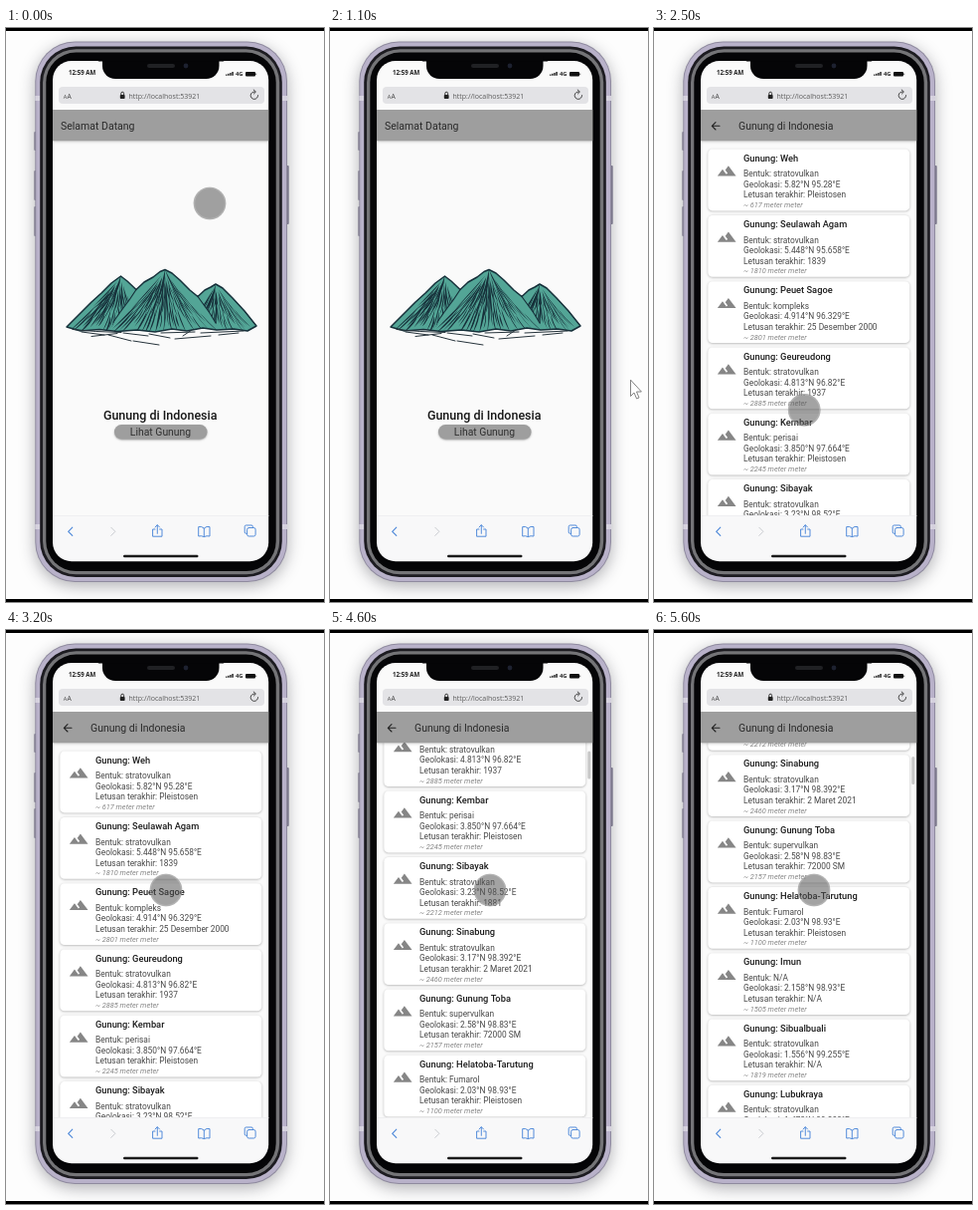
An HTML page with a canvas for the animation above (5.7 s loop, 320 by 576 pixels).

```html
<!DOCTYPE html>
<html lang="id">
<head>
<meta charset="utf-8">
<title>Gunung di Indonesia</title>
<style>
html, body { margin: 0; width: 100%; height: 100%; overflow: hidden; background: #fdfdfd; }
canvas { display: block; width: 320px; height: 576px; }
</style>
</head>
<body>
<canvas id="stage"></canvas>
<script>
const W = 320, H = 576, LOOP = 5700;
const cv = document.getElementById('stage');
const dpr = window.devicePixelRatio || 1;
cv.width = W * dpr;
cv.height = H * dpr;
const c = cv.getContext('2d');
const SANS = 'Roboto, sans-serif';
const BLUE = '#4a86d8';

// name, shape, position, last eruption, height
const peaks = [
  ['Weh', 'stratovulkan', '5.82°N 95.28°E', 'Pleistosen', 617],
  ['Seulawah Agam', 'stratovulkan', '5.448°N 95.658°E', '1839', 1810],
  ['Peuet Sagoe', 'kompleks', '4.914°N 96.329°E', '25 Desember 2000', 2801],
  ['Geureudong', 'stratovulkan', '4.813°N 96.82°E', '1937', 2885],
  ['Kembar', 'perisai', '3.850°N 97.664°E', 'Pleistosen', 2245],
  ['Sibayak', 'stratovulkan', '3.23°N 98.52°E', '1881', 2212],
  ['Sinabung', 'stratovulkan', '3.17°N 98.392°E', '2 Maret 2021', 2460],
  ['Gunung Toba', 'supervulkan', '2.58°N 98.83°E', '72000 SM', 2157],
  ['Helatoba-Tarutung', 'Fumarol', '2.03°N 98.93°E', 'Pleistosen', 1100],
  ['Imun', 'N/A', '2.158°N 98.93°E', 'N/A', 1505],
  ['Sibualbuali', 'stratovulkan', '1.556°N 99.255°E', 'N/A', 1819],
  ['Lubukraya', 'stratovulkan', '1.478°N 99.209°E', 'N/A', 1862]
];

// time, x, y
const path = [
  [0, 205, 176], [250, 212, 190], [600, 246, 262], [850, 284, 326], [1100, 302, 353],
  [1300, 309, 361], [1450, 294, 372], [1650, 190, 402], [1800, 149, 413],
  [2350, 149, 411], [2900, 161, 261], [LOOP, 161, 261]
];
const notches = [3450, 3800, 4200, 4500, 4850, 5150, 5450];
const NOTCH = 56.3, PITCH = 66.3, OPEN = 2050;

const clamp = v => Math.max(0, Math.min(1, v));
const ease = v => v * v * (3 - 2 * v);

function pointerAt(t) {
  let i = 1;
  while (i < path.length - 1 && path[i][0] < t) i++;
  const a = path[i - 1], b = path[i], k = ease(clamp((t - a[0]) / (b[0] - a[0])));
  return [a[1] + (b[1] - a[1]) * k, a[2] + (b[2] - a[2]) * k];
}

function box(x, y, w, h, r, fill) {
  c.beginPath();
  c.roundRect(x, y, w, h, r);
  c.fillStyle = fill;
  c.fill();
}

function shadow(color, blur, dy) {
  c.shadowColor = color;
  c.shadowBlur = blur * dpr;
  c.shadowOffsetY = dy * dpr;
}
const noShadow = () => shadow('transparent', 0, 0);

function text(s, x, y, font, color, align = 'left') {
  c.font = font;
  c.fillStyle = color;
  c.textAlign = align;
  c.fillText(s, x, y);
}

function line(d, color, width) {
  c.strokeStyle = color;
  c.lineWidth = width;
  c.stroke(new Path2D(d));
}

function shape(d, x, y, scale, color) {
  c.save();
  c.translate(x, y);
  c.scale(scale, scale);
  c.fillStyle = color;
  c.fill(new Path2D(d));
  c.restore();
}

function phone() {
  const edge = '#8f8a9f';
  box(28.3, 104, 3, 19, 1, edge);
  box(28.3, 143, 3, 30, 1, edge);
  box(28.3, 179, 3, 30, 1, edge);
  box(281.7, 138, 3, 59, 1, edge);
  shadow('rgba(40,40,50,.36)', 16, 4);
  box(29.3, 13.5, 253.7, 542.5, 40, edge);
  noShadow();
  box(30.3, 14.5, 251.7, 540.5, 39, '#b8b1c9');
  for (const y of [68, 498]) {
    box(29.3, y, 5, 5, 0, '#d5d1de');
    box(278, y, 5, 5, 0, '#d5d1de');
  }
  box(34.2, 18.5, 243.6, 532.5, 36, '#1c1b20');
  box(37, 21.3, 238.2, 527, 33.5, '#747477');
  box(40.3, 24.6, 231.4, 520.4, 30, '#050507');
}

function browser() {
  box(47, 33, 218, 49, 0, '#fafafa');
  text('12:59 AM', 63, 47.2, 'bold 6.1px "Open Sans", sans-serif', '#202020');
  for (let i = 0; i < 4; i++) box(221 + i * 2.1, 47.7 - 1.2 - i * .8, 1.5, 1.2 + i * .8, .3, '#222');
  text('4G', 231, 48.1, 'bold 5.8px "Open Sans", sans-serif', '#222');
  box(241, 44, 10, 4.4, 1, '#111');
  box(251.3, 45.4, .9, 1.6, .4, '#333');

  box(53, 59, 207, 17, 4, '#e3e3e6');
  text('A', 57.8, 71.4, '5.6px "Open Sans", sans-serif', '#444');
  text('A', 61.4, 71.4, '6.8px "Open Sans", sans-serif', '#444');
  box(114.8, 67, 4.8, 4, .8, '#222');
  line('M115.8 67V65.6a1.4 1.4 0 0 1 2.8 0V67', '#222', .9);
  text('http://localhost:53921', 123.5, 70.6, '7px "Open Sans", sans-serif', '#5c5c5c');
  line('M253.6 67.6A3.7 3.7 0 1 1 250.4 64', '#333', .9);
  line('M249.2 62L251.4 64L249.4 66', '#333', .9);

  box(47, 489, 218, 48, 0, '#f8f8f9');
  box(47, 489, 218, .6, 0, '#e8e8ea');
  line('M66.8 501.2L62.7 505.3L66.8 509.4', BLUE, 1.1);
  line('M105.8 501.2L109.9 505.3L105.8 509.4', '#c9cbd0', 1);
  line('M150 503H147.6V510.2H157V503H154.6M152.3 507.3V498.8M150 501L152.3 498.7L154.6 501', BLUE, .95);
  line('M199.3 502Q196.7 499.6 193.7 500.6V510Q196.7 509.2 199.3 510.6Q201.9 509.2 205 510V500.6Q201.9 499.6 199.3 502V510.5', BLUE, .95);
  c.beginPath();
  c.roundRect(242.6, 501.5, 8.5, 8.5, 1.8);
  c.stroke();
  line('M242.6 507.3H241.6Q240.2 507.3 240.2 506V500.4Q240.2 499 241.6 499H247Q248.4 499 248.4 500.4V501.5', BLUE, .95);
  box(118, 528.7, 75.5, 2.5, 1.25, '#1a1a1a');
}

function notch() {
  box(97, 28, 117.5, 23, [0, 0, 13, 13], '#050507');
  box(93, 32, 126, 1.5, 0, '#050507');
  box(142, 36, 28, 4, 2, '#202124');
  c.beginPath();
  c.arc(181, 38, 2.4, 0, 7);
  c.fillStyle = '#1d2130';
  c.fill();
}

function appBar(title, x) {
  shadow('rgba(0,0,0,.3)', 3.5, 1);
  box(47, 82, 218, 31.3, 0, '#9e9e9e');
  noShadow();
  text(title, x, 102, '10.5px ' + SANS, '#2a2a2a');
}

function rng(seed) {
  return () => (seed = (seed * 16807) % 2147483647) / 2147483647;
}

const BASE = 'L243 304L229 302L212 303L198 301L182 304L167 302L150 305L132 303L112 304.5L94 302.5L75 304L61 300';
const RANGE = 'M61 300L72 289L86 275L96 266L106 256L115.5 249L122 254L131 262.5L139 255L148 250' +
  'L155 244.5L160 242.5L167 246L175 253L185 263L193 269.5L200 263L206 260L211 257L218 261' +
  'L228 271L240 284L252 299' + BASE + 'Z';
const MASSIF = 'M160 242.5L148 250L139 255L131 262.5L124 273L115 285L104 304H216L205 286L193 269.5L175 253Z';
const INK = '#16303a', TEAL = '#53a596';

function wedge(x0, y0, x1, y1, bend, w) {
  const mx = (x0 + x1) / 2 + bend, my = (y0 + y1) / 2;
  c.beginPath();
  c.moveTo(x0, y0);
  c.quadraticCurveTo(mx - w, my - w * .4, x1, y1);
  c.quadraticCurveTo(mx + w, my + w * .4, x0, y0);
  c.fillStyle = INK;
  c.fill();
}

// short creases scattered down the slopes, sweeping outwards from a summit
function creases(px, py, left, right, n, rnd) {
  for (let i = 0; i < n; i++) {
    const ex = left + (right - left) * (i + rnd()) / n;
    const a = .06 + .62 * ((i * .618) % 1), b = Math.min(1, a + .24 + rnd() * .3);
    const at = k => [px + (ex - px) * k, py + (306 - py) * Math.pow(k, .85)];
    const side = Math.sign(ex - px);
    wedge(...at(a), ...at(b), -side * (1 + rnd() * 2), .6 + rnd() * 1.1);
  }
}

function mountain() {
  const rnd = rng(73), body = new Path2D(RANGE), massif = new Path2D(MASSIF);
  c.fillStyle = TEAL;
  c.fill(body);
  c.save();
  c.clip(body);
  creases(115.5, 249, 58, 140, 42, rnd);
  creases(211, 257, 178, 254, 36, rnd);
  wedge(211, 257, 202, 284, 2, 2);
  wedge(115.5, 249, 106, 274, 2, 2);
  c.fillStyle = TEAL;
  c.fill(massif);
  c.clip(massif);
  creases(160, 242.5, 100, 216, 64, rnd);
  wedge(160, 242.5, 152, 274, 3, 2);
  wedge(160, 242.5, 176, 272, -2, 1.8);
  c.restore();
  line('M131 262.5L124 273L115 285L108 295M193 269.5L205 286L211 296', INK, 1.2);
  line(RANGE, INK, 1.5);
  line('M67 302.5Q90 305 116 305.5M76 305L99 308M86 309.5L112 306.5M103 308L126 314M118 306L143 309' +
    'M128 314L154 318M144 307L165 311M156 306L190 305M170 312L206 309M196 306L239 304' +
    'M187 303L178 309M214 308L234 306', '#27343c', 1);
}

function home(hover) {
  box(47, 82, 218, 408, 0, '#fafafa');
  appBar('Selamat Datang', 55);
  mountain();
  text('Gunung di Indonesia', 155.2, 393.3, '500 12.5px ' + SANS, '#161616', 'center');
  shadow('rgba(0,0,0,.35)', 2, .8);
  box(109, 398, 93.5, 14.6, 7.3, hover ? '#929292' : '#9e9e9e');
  noShadow();
  text('Lihat Gunung', 155.5, 409.2, '10.4px ' + SANS, '#303030', 'center');
}

const TERRAIN = 'M14 6l-3.75 5 2.85 3.8-1.6 1.2C9.81 13.75 7 10 7 10l-6 8h22L14 6z';

function card(p, y) {
  const [name, form, place, last, height] = p;
  shadow('rgba(0,0,0,.28)', 2.5, .7);
  box(54.3, y, 203, 61.8, 4.5, '#fff');
  noShadow();
  shape(TERRAIN, 63, y + 11.6, .85, '#868686');
  text('Gunung: ' + name, 90, y + 12, '500 9.3px ' + SANS, '#1c1c1c');
  const rows = ['Bentuk: ' + form, 'Geolokasi: ' + place, 'Letusan terakhir: ' + last];
  rows.forEach((s, i) => text(s, 90, y + 27.6 + i * 10.5, '8.38px ' + SANS, '#484848'));
  text('~ ' + height + ' meter meter', 90, y + 58.3, 'italic 7.4px ' + SANS, '#858585');
}

function list(t) {
  const scroll = NOTCH * notches.filter(n => n <= t).length;
  box(47, 82, 218, 408, 0, '#fafafa');
  c.save();
  c.beginPath();
  c.rect(47, 113, 218, 376);
  c.clip();
  peaks.forEach((p, i) => {
    const y = 121.6 + i * PITCH - scroll;
    if (y > 45 && y < 492) card(p, y);
  });
  const show = clamp((t - notches[0]) / 150);
  if (show) box(259.3, 114 + scroll * .033, 3, 28, 1.5, 'rgba(0,0,0,' + .2 * show + ')');
  c.restore();
  appBar('Gunung di Indonesia', 85);
  line('M66 98.3H58.4M62 94.6L58.3 98.3L62 102', '#222', 1.1);
}

function pointer(x, y) {
  if (x < 264) {
    c.beginPath();
    c.arc(x, y, 16.3, 0, 7);
    c.fillStyle = 'rgba(85,85,85,.54)';
    c.fill();
    c.beginPath();
    c.arc(x, y, 15.6, 0, 7);
    c.strokeStyle = 'rgba(200,200,200,.4)';
    c.lineWidth = 1.4;
    c.stroke();
    return;
  }
  c.save();
  c.translate(x, y);
  const arrow = 'M.5 .5V16.5L4 13L6.6 19L9 18L6.5 12H11Z';
  shape(arrow, 0, 0, 1, '#fff');
  line(arrow, '#777', .9);
  c.restore();
}

function draw(t) {
  c.setTransform(dpr, 0, 0, dpr, 0, 0);
  c.lineCap = c.lineJoin = 'round';
  c.fillStyle = '#fdfdfd';
  c.fillRect(0, 0, W, H);
  phone();

  const [x, y] = pointerAt(t);
  c.save();
  c.beginPath();
  c.roundRect(47, 33, 217.2, 502.2, 19);
  c.clip();
  const k = clamp((t - OPEN) / 300);
  if (k < 1) home(Math.abs(x - 155) < 47 && Math.abs(y - 405) < 12);
  if (k > 0) {
    const s = .88 + .12 * (1 - Math.pow(1 - k, 3));
    c.save();
    c.beginPath();
    c.rect(47, 82, 218, 408);
    c.clip();
    c.globalAlpha = clamp(k * 1.8);
    c.translate(156, 286);
    c.scale(s, s);
    c.translate(-156, -286);
    list(t);
    c.restore();
  }
  browser();
  c.restore();
  notch();
  pointer(x, y);

  c.fillStyle = '#000';
  c.fillRect(0, 0, W, 3);
  c.fillRect(0, 573, W, 3);
}

const start = performance.now();
function tick() {
  draw((performance.now() - start) % LOOP);
  requestAnimationFrame(tick);
}
tick();
</script>
</body>
</html>
```
